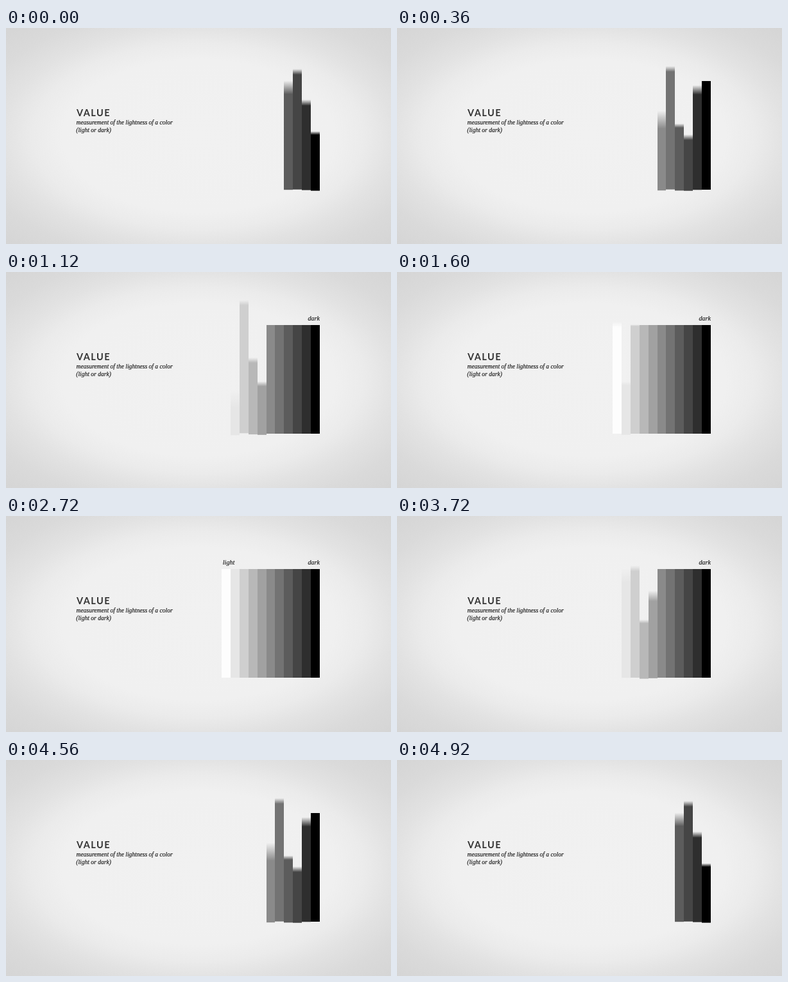
Recreate the animation shown at these times as an HTML page with a canvas. Size 600 by 338 pixels, loop 4960 ms.

```html
<!DOCTYPE html>
<html lang="en">
<head>
<meta charset="utf-8">
<title>Value</title>
<style>
html, body { margin: 0; width: 100%; height: 100%; overflow: hidden; }
#stage {
  position: relative; width: 600px; height: 338px; overflow: hidden;
  background: radial-gradient(ellipse farthest-corner at 50% 50%,
    #f1f1f1 0, #f0f0f0 50%, #ebebeb 61%, #e2e2e2 72%, #dadada 85%, #d5d5d5 100%);
}
canvas, svg { position: absolute; left: 0; top: 0; }
.title { font: 700 14.5px Lato, sans-serif; letter-spacing: 1.5px; fill: #333; }
.note { font: italic 9.54px "Liberation Serif", serif; fill: #222; stroke: #222; stroke-width: .2px; }
.label { font-size: 10px; }
</style>
</head>
<body>
<div id="stage">
  <canvas id="bars" width="600" height="338"></canvas>
  <svg width="600" height="338">
    <text class="title" x="110" y="138.3">VALUE</text>
    <text class="note" x="109.6" y="151">measurement of the lightness of a color</text>
    <text class="note" x="109.3" y="163.3">(light or dark)</text>
    <text class="note label" id="light" x="337" y="76">light</text>
    <text class="note label" id="dark" x="470.6" y="76">dark</text>
  </svg>
</div>
<script>
const LOOP = 4960, STEP = 40, COUNT = 11;
const BASE = 253, TOP = 83;
const ctx = document.getElementById('bars').getContext('2d');

// Start time of each bar, lightest first
const starts = [1270, 1070, 870, 670, 470, 270, 70, -130, -300, -403, -528];

// Height of a bar's top edge over its own time: [ms, y]
const path = [
  [0, 253], [50, 198], [130, 93], [205, 38], [250, 48], [330, 82], [450, 138],
  [530, 165], [610, 184], [650, 175], [690, 155], [730, 125], [770, 92], [800, TOP]
];

function slope(i) {
  const a = path[i - 1], b = path[i + 1];
  return a && b ? (b[1] - a[1]) / (b[0] - a[0]) : 0;
}

function topAt(t) {
  if (t <= 0) return BASE;
  if (t >= 800) return TOP;
  const i = path.findIndex(p => p[0] > t) - 1;
  const [t0, y0] = path[i], [t1, y1] = path[i + 1];
  const d = t1 - t0, u = (t - t0) / d, v = 1 - u;
  return v * v * (1 + 2 * u) * y0 + u * u * (3 - 2 * u) * y1
    + d * u * v * (v * slope(i) - u * slope(i + 1));
}

const edge = i => Math.round(336 + i * 13.91);

function drawBar(i, s) {
  let t = s - starts[i];
  if (t <= 0) return;
  // the light bars settle a little sooner
  if (i < 3 && t > 330) t = 330 + (t - 330) * 1.16;
  const y = topAt(t);
  const blur = Math.abs(topAt(t + 10) - topAt(t - 10));
  const bottom = BASE + (y - TOP) * 0.02;
  const g = i === COUNT - 1 ? 0 : 253 - 23 * i;
  const y0 = y - blur / 2;
  ctx.fillStyle = `rgb(${g},${g},${g})`;
  if (blur > 0.5) {
    const fade = ctx.createLinearGradient(0, y0, 0, y0 + blur);
    fade.addColorStop(0, `rgba(${g},${g},${g},0)`);
    fade.addColorStop(1, ctx.fillStyle);
    ctx.fillStyle = fade;
  }
  ctx.fillRect(edge(i), y0, edge(i + 1) - edge(i), bottom - y0);
}

function slide(id, s, start, length, from) {
  const p = Math.min(1, Math.max(0, (s - start) / length));
  const el = document.getElementById(id);
  el.setAttribute('transform', `translate(${from * (1 - p) ** 2} 0)`);
  el.setAttribute('opacity', Math.min(1, p * 1.6));
}

function draw(now) {
  const t = Math.floor((now % LOOP) / STEP) * STEP;
  const s = Math.min(t, LOOP - STEP - t); // plays forward, then back
  ctx.clearRect(0, 0, 600, 338);
  for (let i = 0; i < COUNT; i++) drawBar(i, s);
  slide('light', s, 1800, 440, 100);
  slide('dark', s, 720, 400, -100);
}

const begin = performance.now();
function tick() {
  draw(performance.now() - begin);
  requestAnimationFrame(tick);
}
tick();
</script>
</body>
</html>
```
